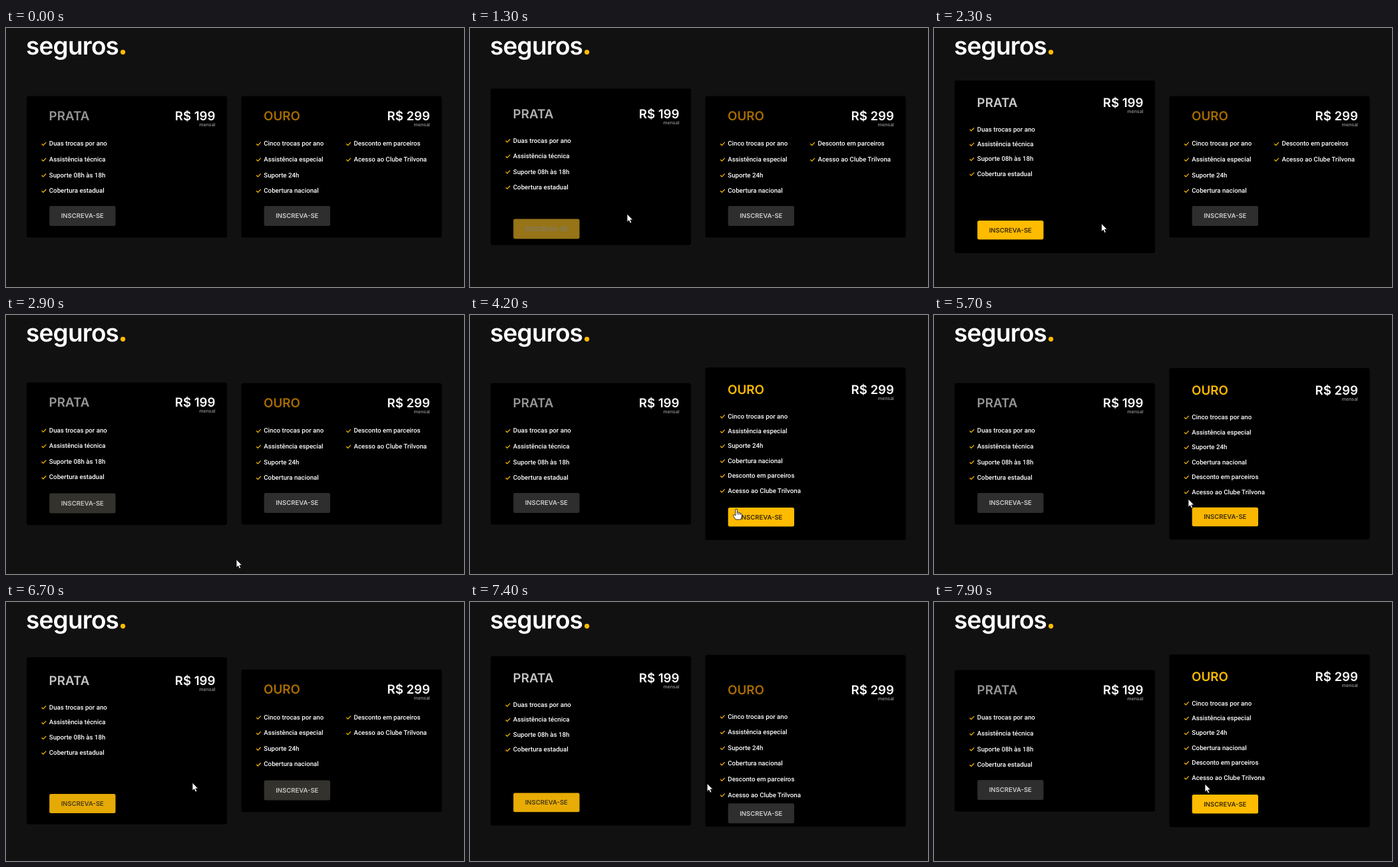
Write an HTML page that moves like this. It is 688 px wide and 390 px high and loops after 8 s.

```html
<!DOCTYPE html>
<html lang="pt-BR">
<head>
<meta charset="utf-8">
<title>Seguros</title>
<style>
  html, body { margin: 0; width: 100%; height: 100%; overflow: hidden; background: #111; }
  svg { display: block; width: 688px; height: 390px; }
  text { font-family: Inter, "Open Sans", sans-serif; font-weight: 600; text-rendering: geometricPrecision; }
  .heading { font-size: 37px; letter-spacing: -.8px; fill: #fff; }
  .title { font-size: 18.8px; }
  .price { font-size: 18.6px; fill: #fff; text-anchor: end; }
  .period { font-size: 7px; font-weight: 500; fill: #999; text-anchor: end; }
  .item { font: 500 9.7px Roboto, sans-serif; fill: #fff; }
  .check { fill: none; stroke: #fb0; stroke-width: 1.2; }
  .label { font-size: 9.5px; text-anchor: middle; }
</style>
</head>
<body>
<svg id="stage" viewBox="0 0 688 390">
  <text class="heading" x="30" y="39.7">seguros</text>
  <circle cx="175.6" cy="36.3" r="3.6" fill="#fb0"/>
</svg>
<script>
const LOOP = 8000, STEP = 100, FADE = 500, MID = 209;
const stage = document.getElementById('stage');

function add(parent, tag, attrs, content) {
  const el = document.createElementNS('http://www.w3.org/2000/svg', tag);
  set(el, attrs);
  if (content) el.textContent = content;
  parent.appendChild(el);
  return el;
}
function set(el, attrs) {
  for (const key in attrs) el.setAttribute(key, attrs[key]);
}
const clamp = v => Math.min(1, Math.max(0, v));
const smooth = v => { const u = clamp(v); return u * u * (3 - 2 * u); };
const lerp = (a, b, p) => a + (b - a) * p;
const mix = (a, b, p) => `rgb(${a.map((v, i) => Math.round(lerp(v, b[i], p)))})`;

const plans = [
  {
    x: 31, name: 'PRATA', price: 'R$ 199', dim: [150, 150, 150], lit: [204, 204, 204],
    items: ['Duas trocas por ano', 'Assistência técnica', 'Suporte 08h às 18h', 'Cobertura estadual'],
    hovers: [[1180, 2450], [6382, 7300]]
  },
  {
    x: 353.5, name: 'OURO', price: 'R$ 299', dim: [167, 107, 0], lit: [255, 187, 0],
    items: ['Cinco trocas por ano', 'Assistência especial', 'Suporte 24h', 'Cobertura nacional',
      'Desconto em parceiros', 'Acesso ao Clube Trilvona'],
    hovers: [[3400, 4600], [5285, 6250], [7400, 9000]]
  }
];

for (const plan of plans) {
  const g = add(stage, 'g', { transform: `translate(${plan.x} 0)` });
  plan.box = add(g, 'rect', { width: 301, rx: 3 });
  plan.title = add(g, 'text', { class: 'title', x: 33.6 }, plan.name);
  plan.cost = add(g, 'text', { class: 'price', x: 283.4 }, plan.price);
  plan.period = add(g, 'text', { class: 'period', x: 283.4 }, 'mensal');
  plan.rows = plan.items.map(text => {
    const row = add(g, 'g', {});
    add(row, 'path', { class: 'check', d: 'M22.6 .5l2.3 2.2 4.3-4.5' });
    add(row, 'text', { class: 'item', x: 33.8, y: 3.4 }, text);
    return row;
  });
  plan.button = add(g, 'rect', { x: 34.2, width: 99.3, rx: 2.5 });
  plan.label = add(g, 'text', { class: 'label', x: 83.8 }, 'INSCREVA-SE');
}

// time, x, y of the pointer tip
const path = [
  [800, 440, 372], [1300, 236, 280], [1600, 228, 276], [2200, 228, 276],
  [2700, 346, 368], [3100, 346, 368], [3600, 400, 292], [4200, 400, 292],
  [4700, 425, 345], [5000, 430, 353], [5200, 430, 353], [5500, 382, 277],
  [6100, 382, 277], [6700, 280, 272], [7100, 280, 272], [7600, 407, 274], [8000, 407, 274]
];
const ink = { fill: '#fff', stroke: '#000', 'stroke-width': .8, 'stroke-linejoin': 'round' };
const pointer = add(stage, 'g', {});
const arrow = add(pointer, 'path', { ...ink, d: 'M0 0V12.2L2.7 9.7 4.6 14 6.8 13 4.9 8.9H8.6Z' });
const hand = add(pointer, 'g', {});
add(hand, 'path', { ...ink,
  d: 'M-1.3 1Q0-.9 1.3 1V5.5Q2.8 4.5 3.7 6 5.2 5.2 6 6.7 8 6.2 8.3 8V11.5L6.8 16H-.8L-4.8 10.2Q-5-.2-1.3 10Z'
    .replace('-5-.2-1.3 10Z', '-4.3 7.6-1.3 10Z') });
add(hand, 'path', { d: 'M1.3 5.5V8.5M3.7 6V9M6 6.7V9.3', fill: 'none', stroke: '#000', 'stroke-width': .7 });

function hoverAt(plan, t) {
  let q = 0, on = false;
  for (const [start, end] of plan.hovers) {
    q = Math.max(q, smooth((t - start) / FADE) * (1 - smooth((t - end) / FADE)));
    on = on || (t >= start && t < end);
  }
  return { q, on };
}

function drawPlan(plan, t) {
  const { q, on } = hoverAt(plan, t);
  const title = -77 - 20 * q;
  const first = title + (on ? 40.2 : 42 - 1.8 * q);
  const gap = lerp(23.6, 22.4, q);
  const perColumn = on ? 6 : 4;
  const lastRow = first + gap * (Math.min(plan.items.length, perColumn) - 1);
  const button = on ? Math.max(93.2 + 2 * q, lastRow + 28) : 74 + 21 * q;
  const half = on ? Math.max(115.7 + 14.3 * q, button + 20) : 106.5 + 23.5 * q;
  const tint = on ? Math.pow(q, .36) : q;
  const height = lerp(30, 28.5, q);

  set(plan.box, { y: MID - half, height: half * 2 });
  set(plan.title, { y: MID + title + 6.9, fill: mix(plan.dim, plan.lit, tint) });
  set(plan.cost, { y: MID + title + 6.9 });
  set(plan.period, { y: MID + title + 15.6 });
  plan.rows.forEach((row, i) => {
    const x = 135.2 * Math.floor(i / perColumn);
    set(row, { transform: `translate(${x} ${MID + first + gap * (i % perColumn)})` });
  });
  set(plan.button, { y: MID + button - height / 2, height, fill: mix([46, 46, 46], [255, 187, 0], tint) });
  set(plan.label, { y: MID + button + 3.4, fill: mix([204, 204, 204], [56, 41, 0], tint) });
}

function drawPointer(t) {
  pointer.style.display = t < path[0][0] ? 'none' : '';
  const i = Math.max(1, path.findIndex(p => p[0] > t));
  const [t0, x0, y0] = path[i - 1], [t1, x1, y1] = path[i];
  const p = clamp((t - t0) / (t1 - t0));
  const x = lerp(x0, x1, p), y = lerp(y0, y1, p);
  const overButton = x > 388 && x < 487 && y > 290 && y < 318;
  arrow.style.display = overButton ? 'none' : '';
  hand.style.display = overButton ? '' : 'none';
  set(pointer, { transform: `translate(${x} ${y})` });
}

const begin = performance.now();
function frame() {
  const elapsed = Math.max(0, performance.now() - begin) % LOOP;
  const t = Math.floor(elapsed / STEP) * STEP;
  plans.forEach(plan => drawPlan(plan, t));
  drawPointer(t);
  requestAnimationFrame(frame);
}
frame();
</script>
</body>
</html>
```
